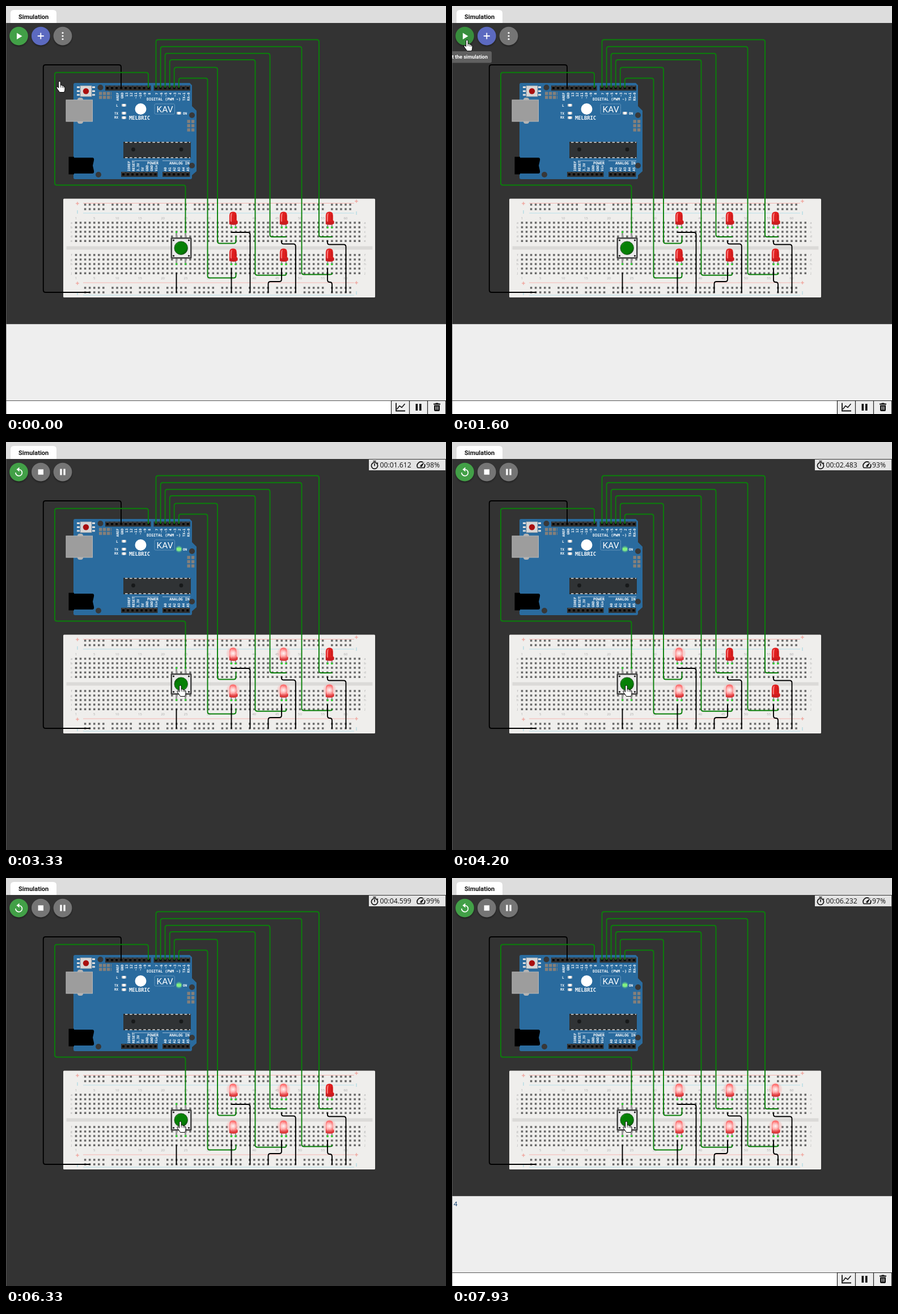
An HTML page that plays this animation: 776 px wide and 721 px high, repeating every 8000 ms.

```html
<!DOCTYPE html>
<html lang="en">
<head>
<meta charset="utf-8">
<title>Dice circuit simulation</title>
<style>
html, body { margin: 0; width: 100%; height: 100%; overflow: hidden; background: #333; }
svg { display: block; width: 776px; height: 721px; }
text { white-space: pre; }
.ui { font-family: Roboto, Arial, sans-serif; font-weight: 700; }
.read { font-family: "Open Sans", "Noto Sans", sans-serif; font-size: 12.2px; }
.silk { font-family: "DejaVu Sans Mono", monospace; font-weight: 700; fill: #fff; }
.bb { font-family: "Open Sans", sans-serif; font-size: 6px; fill: #aaa; text-anchor: middle; }
</style>
</head>
<body>
<svg id="stage" viewBox="0 0 776 721">
  <defs>
    <radialGradient id="glow">
      <stop offset="0" stop-color="#fff" stop-opacity=".95"/>
      <stop offset=".35" stop-color="#ffd0d0" stop-opacity=".85"/>
      <stop offset="1" stop-color="#ff8080" stop-opacity="0"/>
    </radialGradient>
    <radialGradient id="greenGlow">
      <stop offset="0" stop-color="#b0ffb0"/>
      <stop offset=".5" stop-color="#80ff80" stop-opacity=".6"/>
      <stop offset="1" stop-color="#80ff80" stop-opacity="0"/>
    </radialGradient>
    <linearGradient id="capUp" x1="0" y1="0" x2="1" y2="1">
      <stop offset="0" stop-color="#4fae4f"/><stop offset=".25" stop-color="#068006"/>
      <stop offset=".7" stop-color="#068006"/><stop offset="1" stop-color="#003c00"/>
    </linearGradient>
    <linearGradient id="capDown" x1="1" y1="1" x2="0" y2="0">
      <stop offset="0" stop-color="#4fae4f"/><stop offset=".25" stop-color="#068006"/>
      <stop offset=".7" stop-color="#068006"/><stop offset="1" stop-color="#003c00"/>
    </linearGradient>
    <filter id="shadow" x="-30%" y="-30%" width="160%" height="170%">
      <feDropShadow dx="0" dy="2" stdDeviation="1.8" flood-opacity=".4"/>
    </filter>
  </defs>
</svg>
<script>
const NS = 'http://www.w3.org/2000/svg';
const stage = document.getElementById('stage');
let layer = stage;

function add(tag, attrs, content) {
  const el = document.createElementNS(NS, tag);
  for (const key in attrs) el.setAttribute(key, attrs[key]);
  if (content !== undefined) el.textContent = content;
  layer.appendChild(el);
  return el;
}
const rect = (x, y, width, height, fill, more) => add('rect', { x, y, width, height, fill, ...more });
const circle = (cx, cy, r, fill, more) => add('circle', { cx, cy, r, fill, ...more });
const path = (d, fill, more) => add('path', { d, fill, ...more });
const line = (d, stroke, width = 1, more) => path(d, 'none', { stroke, 'stroke-width': width, ...more });
const label = (x, y, text, cls, more) => add('text', { x, y, class: cls, ...more }, text);
function group(draw, attrs) {
  const parent = layer;
  const g = layer = add('g', attrs);
  draw();
  layer = parent;
  return g;
}
const show = (el, on) => el.setAttribute('visibility', on ? 'visible' : 'hidden');

const PITCH = 8.06;

function drawHeader() {
  rect(0, 0, 776, 30, '#ddd');
  path('M8 30V13Q8 7 14 7H83Q89 7 89 13V30Z', '#fff');
  label(22, 22.5, 'Simulation', 'ui', { 'font-size': 11, fill: '#111' });
  rect(0, 30, 1, 691, '#555');
}

function drawBoard() {
  path('M119 139Q119 136 122 136H324L328 140V177L336 185V292L328 299V303Q328 306 325 306H122Q119 306 119 303Z', '#2a6b9e');
  for (const [x, y] of [[166.5, 144], [328, 193], [328, 282], [163, 298]]) circle(x, y, 5, '#383838');

  rect(126, 162, 10, 46, '#b4b4b4', { rx: 4 });
  rect(106, 166, 46.5, 38, '#9d9d9d', { stroke: '#b8b8b8' });
  path('M110.500 266.500H120V268H152Q156 268 155 273L153 282L155 291Q156 296 152 296H120V297.500H110.500Z', '#000');

  line('M125 143.500H157M125 150.500H157M125 157H157', '#ddd', 3, { 'stroke-dasharray': '5 22' });
  rect(131, 141, 20, 19, '#d6d6d6', { stroke: '#999', 'stroke-width': .6 });
  circle(141, 150.500, 5.2, '#a90e0e');

  line('M164 154.500H186M164 161.500H186', '#85807a', 5.4, { 'stroke-dasharray': '5.400 1.600' });
  line('M319.500 204H333M319.500 211.500H333M319.500 219H333', '#85807a', 5.4, { 'stroke-dasharray': '5.400 2' });

  for (const [x, y, n] of [[175, 140.500, 10], [260.500, 140.500, 8], [203, 293, 8], [276, 293, 6]]) {
    rect(x, y, n * PITCH, 9, '#2f2f2f');
    line(`M${x + 2} ${y + 4.500}h${n * PITCH - 2}`, '#080808', 4, { 'stroke-dasharray': '4 4.060' });
    line(`M${x + 1.500} ${y + 1.300}h${n * PITCH - 2}`, '#565656', 1, { 'stroke-dasharray': '5 3.060' });
  }

  const upright = (x, y, text, anchor) =>
    label(0, 0, text, 'silk', { 'font-size': 6, 'text-anchor': anchor, transform: `translate(${x} ${y}) rotate(-90)` });
  const pins = (list, x, y, anchor) =>
    list.split(' ').forEach((text, i) => upright(x + i * PITCH, y, text, anchor));
  pins('AREF GND 13 12 ~11 ~10 ~9 8', 198.500, 153, 'end');
  pins('7 ~6 ~5 4 ~3 2 TX→1 RX←0', 267.500, 153, 'end');
  pins('IOREF RESET 3.3V 5V GND GND Vin', 218.500, 292, 'start');
  pins('A0 A1 A2 A3 A4 A5', 282.500, 292, 'start');

  label(248, 167, 'DIGITAL (PWM ~)', 'silk', { 'font-size': 6.7 });
  label(249, 280, 'POWER', 'silk', { 'font-size': 6.6 });
  label(288, 280, 'ANALOG IN', 'silk', { 'font-size': 6.6 });
  line('M222 273.500H269M276 273.500H325', '#c8dcec', .7);

  label(194, 178, 'L', 'silk', { 'font-size': 6 });
  label(191, 192, 'TX', 'silk', { 'font-size': 6 });
  label(191, 199, 'RX', 'silk', { 'font-size': 6 });
  label(312, 192, 'ON', 'silk', { 'font-size': 6 });
  for (const [x, y] of [[204, 173], [204, 187], [204, 195], [301, 187]]) {
    rect(x, y, 8, 4.600, '#c8c8c8', { rx: .5 });
    rect(x + 2, y, 4, 4.600, '#fff');
  }

  circle(237.500, 182, 10, '#fff');
  rect(262, 173, 35.500, 18, 'none', { rx: 2, stroke: '#9fc0da', 'stroke-width': .8, 'stroke-dasharray': '1.500 1' });
  label(280, 187.500, 'KAV', 'ui', { 'font-size': 15.5, 'font-weight': 400, style: 'font-weight:400', fill: '#fff', 'text-anchor': 'middle' });
  label(217, 201, 'MELBRIC', 'silk', { 'font-size': 8.8 });

  rect(207, 240, 119, 29, '#292c2d');
  line('M210 241H325M210 268H325', '#b0b0b0', 2, { 'stroke-dasharray': '4.500 3.560' });
  rect(207, 243, 119, 23, '#303335');
  circle(224.500, 253.500, 3.4, '#17191a');
  circle(309, 253.500, 3.4, '#17191a');
}

function drawBreadboard() {
  rect(101, 340.500, 550, 174.500, '#efeeec', { rx: 1.5 });
  rect(106.500, 424.500, 540, 6, '#dbdad8');
  line('M136 348.500H614M136 489H614', '#f5b5b0', 1);
  line('M136 366H614M136 511H614', '#b5e0ea', 1);
  for (const [x, y] of [[126, 349], [618, 345], [126, 490], [618, 489]]) line(`M${x - 3} ${y}h6M${x} ${y - 3}v6`, '#f08880', .9);
  for (const [x, y] of [[126, 364], [618, 366], [126, 508], [618, 507]]) line(`M${x} ${y - 3}v6`, '#8fd0e0', .9);

  const hole = 3.5, gap = PITCH - hole;
  const rail = `${`${hole} ${gap} `.repeat(4)}${hole} ${gap + PITCH}`;
  for (const y of [351, 359, 498, 506])
    line(`M${139.600 - hole / 2} ${y}H609`, '#686868', hole, { 'stroke-dasharray': rail });
  [...'abcdefghij'].forEach((letter, i) => {
    const y = 383 + i * PITCH + (i > 4 ? 16.600 : 0);
    line(`M${123.500 - hole / 2} ${y}H625.500`, '#686868', hole, { 'stroke-dasharray': `${hole} ${gap}` });
    for (const x of [115.500, 633]) label(x, y + 2, letter, 'bb');
  });
  for (let n = 0; n <= 60; n += 5) {
    const column = n || 1;
    for (const y of [377, 483]) label(123.500 + (column - 1) * PITCH, y, column, 'bb');
  }
}

function drawButton() {
  line('M300.500 399V410M316.500 399V410M300.500 445V456M316.500 445V456', '#9a9a9a', 3);
  for (const x of [300.500, 316.500]) for (const y of [399.500, 456]) circle(x, y, 1.8, '#2bd42b');
  rect(290.500, 409, 37, 37.500, '#424242', { rx: 1.5 });
  rect(293, 411.500, 32, 32.500, '#eaeaea');
  for (const x of [295.500, 322.500]) for (const y of [414, 441.500]) circle(x, y, 1.6, '#1c1c1c');
  return circle(308.700, 427.700, 11.8, 'url(#capUp)', { stroke: '#2c4a2c', 'stroke-width': .8 });
}

function drawLed(x, y) {
  line(`M${x - 3.300} ${y + 20}V${y + 27}M${x + 4.300} ${y + 20}V${y + 27}`, '#8c8c8c', 1.8);
  circle(x - 3.300, y + 27, 1.7, '#2bd42b');
  circle(x + 4.300, y + 27, 1.7, '#2bd42b');
  const shape = `M${x - 6.600} ${y + 21}V${y + 6}Q${x - 6.600} ${y - 1} ${x} ${y - 1}T${x + 6.300} ${y + 6}V${y + 14}L${x + 8} ${y + 16}V${y + 20}Q${x + 4} ${y + 23} ${x} ${y + 22}Z`;
  const body = path(shape, '#e01e1e');
  path(`M${x - 6.600} ${y + 14}Q${x} ${y + 18} ${x + 8} ${y + 15.500}V${y + 20}Q${x} ${y + 24} ${x - 6.600} ${y + 21}Z`, '#b81c20', { opacity: .55 });
  path(`M${x - 4.800} ${y + 16}V${y + 6}Q${x - 4.500} ${y + 2} ${x - 1.500} ${y + 1}Q${x - 2.800} ${y + 7} ${x - 2.500} ${y + 17}Z`, '#ff9a9a', { opacity: .7 });
  line(`M${x + 4} ${y + 4}V${y + 14}`, '#a81818', 1.4, { opacity: .6 });
  const halo = circle(x, y + 9, 12.5, 'url(#glow)');
  return on => {
    body.setAttribute('fill', on ? '#ff4848' : '#e01e1e');
    show(halo, on);
  };
}

// Corner points alternate: x0, y0, y1, x1, y2, x2 ... with rounded bends.
function wire(color, x, y, ...turns) {
  const points = [[x, y]];
  let vertical = true;
  for (const v of turns) {
    if (vertical) y = v; else x = v;
    points.push([x, y]);
    vertical = !vertical;
  }
  let d = `M${points[0]}`;
  for (let i = 1; i < points.length - 1; i++) {
    const [cx, cy] = points[i];
    const toward = ([px, py]) => {
      const length = Math.hypot(px - cx, py - cy) || 1, r = Math.min(4, length / 2);
      return [cx + (px - cx) / length * r, cy + (py - cy) / length * r];
    };
    d += `L${toward(points[i - 1])}Q${points[i]} ${toward(points[i + 1])}`;
  }
  line(d + `L${points.at(-1)}`, color, 1.9, { 'stroke-linecap': 'round' });
}

function drawWires() {
  const green = '#0a800a', black = '#000';
  wire(black, 203, 144, 104, 65.800, 506, 148);
  wire(green, 251, 144, 117.500, 86, 316.500, 316.500, 399);
  wire(green, 264.500, 144, 59.500, 552, 408, 575);
  wire(green, 272.600, 144, 71.800, 521.500, 474.500, 575, 472);
  wire(green, 280.600, 144, 83.800, 465.500, 408, 494);
  wire(green, 288.700, 144, 95, 439.500, 475.800, 494, 472);
  wire(green, 296.700, 144, 108.500, 373, 419.500, 405.500, 407);
  wire(green, 304.800, 144, 127.500, 355.500, 480.500, 405.500, 472);
  wire(black, 397.500, 400, 400, 430.500, 506);
  wire(black, 397.500, 464, 506);
  wire(black, 486, 415, 420.500, 510.800, 506);
  wire(black, 486, 464, 487, 462.500, 506);
  wire(black, 567, 415, 421.500, 599.500, 506);
  wire(black, 567, 464, 488, 575, 506);
  wire(black, 300.500, 472, 506);
}

const roundButton = (x, fill) => circle(x, 53, 16.3, fill, { filter: 'url(#shadow)' });

function drawIdleTools() {
  roundButton(61.300, '#5c6bc0');
  roundButton(100, '#757575');
  path('M19 47.500V59L28.500 53.250Z', '#fff');
  line('M55.800 53H66.800M61.300 47.500V58.500', '#fff', 1.8);
  for (const y of [47.500, 53, 58.500]) circle(100, y, 1.6, '#fff');
}

function drawRunTools() {
  roundButton(61.300, '#757575');
  roundButton(100, '#757575');
  line('M17 54A5.700 5.700 0 1 0 22.500 48.500', '#fff', 1.7);
  path('M23.500 44.500V52.500L18.500 48.500Z', '#fff');
  rect(56.600, 48.300, 9.4, 9.4, '#fff');
  rect(95.300, 47.500, 3.3, 11, '#fff');
  rect(101.400, 47.500, 3.3, 11, '#fff');
}

function drawReadout() {
  rect(640, 31, 135, 19, '#e4e4e4');
  circle(650, 41.800, 5.6, 'none', { stroke: '#111', 'stroke-width': 1.7 });
  line('M647.500 33.700H652.500M650 38V42.500M654.500 36.500L656 38', '#111', 1.6);
  line('M726 45.500A7 7 0 0 1 735.500 36M738.300 39A7 7 0 0 1 737.500 45.500H726', '#111', 1.7);
  path('M738 35.500L733.500 43.500Q731.500 45 730.500 43Q730 41.500 731.500 40.500Z', '#111');
  return [label(659.500, 45.300, '', 'read', { fill: '#111' }), label(741, 45.300, '', 'read', { fill: '#111' })];
}

function drawMonitor() {
  rect(0, 562, 776, 135, '#eee');
  rect(0, 697, 776, 24, '#fff');
  line('M0 562.500H776', '#ccc');
  line('M0.500 562V721', '#999');
  line('M0 697.500H776', '#555');
  rect(679, 697, 97, 24, '#eee');
  line('M679 697.500H776M679.500 697V721M711.500 697V721M743.500 697V721M775.500 697V721', '#222', 1.2);
  line('M688 701.500V715.500H704', '#111', 1.8);
  line('M689.500 712.500L694 706.500L698 709.500L703.500 703', '#111', 1.6);
  rect(722.500, 703, 3.6, 12, '#111');
  rect(729, 703, 3.6, 12, '#111');
  path('M754 704.500H766V702.500H763L762 701.500H758L757 702.500H754ZM755 705.500H765V714Q765 716 763 716H757Q755 716 755 714Z', '#111');
  line('M758.400 707.500V713.500M761.600 707.500V713.500', '#eee', 1.3);
}

function drawCursor() {
  path('M-2.300 10V.800Q-2.300-1-.600-1T1.200.800V6Q3.800 4.700 4.300 7Q6.300 6 6.900 8.300Q9 7.800 9 10V13Q9 15.500 7.500 18.500H-.500Q-2 16-4 13.500Q-6.500 10.500-6 9Q-4.800 7.800-2.300 10.500Z',
    '#fff', { stroke: '#000', 'stroke-width': 1, 'stroke-linejoin': 'round' });
  line('M1.200 6V10M4.300 7.500V10.500M6.900 8.500V11', '#000', .8);
}

rect(0, 30, 776, 691, '#333');
drawHeader();
drawBoard();
const powerGlow = circle(305, 189.300, 6.5, 'url(#greenGlow)');
const powerLed = rect(301, 187, 8, 4.6, '#80f080', { rx: 1 });
drawBreadboard();
const cap = drawButton();
// Bottom and top of each column, in pin order.
const leds = [400.500, 489.500, 570.500].flatMap(x => [429.500, 364.500].map(y => drawLed(x, y)));
drawWires();
const mainButton = roundButton(22.500, '#43a047');
const idleTools = group(drawIdleTools);
const runTools = group(drawRunTools);
let clock, speed;
const readout = group(() => [clock, speed] = drawReadout());
const monitor = group(drawMonitor);
const result = label(3, 579.500, '4', 'read', { fill: '#036', style: 'font-size:11.5px' });
const tooltip = group(() => {
  rect(-26, 80, 96, 20.500, '#606060', { rx: 3 });
  label(63, 93.200, 'Start the simulation', 'ui', { 'font-size': 9, fill: '#fff', 'text-anchor': 'end' });
});
const cursor = group(drawCursor);

const LOOP = 8000, STEP = 200 / 3;
const RUN = 1730, RESULT = 6600;
const cursorKeys = [[0, 95, 134], [200, 94, 132], [870, 68, 110], [1200, 40, 76], [1470, 27, 61], [1800, 27, 61],
  [2000, 120, 205], [2270, 289, 436], [2400, 300, 434], [2670, 308, 431], [8000, 308, 431]];
const clockKeys = [[1800, 83], [2270, 550], [4200, 2483], [5270, 3549], [6330, 4599], [7930, 6232]];
const speedSteps = [[1800, 95], [2000, 97], [2670, 99], [2930, 100], [3330, 98], [3530, 100], [3800, 96], [4130, 93],
  [4470, 97], [4800, 98], [5270, 100], [5470, 99], [6730, 98], [7070, 100], [7400, 99], [7870, 97]];
const rolls = [{ start: 3000, faces: '251462362541362452' }, { start: 7530, faces: '316' }];
const presses = [[2870, 3600], [7270, 7670]];

function tween(keys, t) {
  let i = 1;
  while (i < keys.length - 1 && keys[i][0] < t) i++;
  const [a, b] = [keys[i - 1], keys[i]];
  const f = Math.max(0, Math.min(1, (t - a[0]) / (b[0] - a[0])));
  return a.slice(1).map((v, n) => v + (b[n + 1] - v) * f);
}
const latest = (steps, t) => steps.reduce((value, [at, v]) => t >= at ? v : value, 0);

function litCount(t) {
  for (const { start, faces } of rolls) {
    const i = Math.floor((t - start) / 200);
    if (i >= 0 && i < faces.length) return +faces[i];
  }
  return t >= RESULT ? 4 : 0;
}

function render(time) {
  const t = Math.round(Math.floor((time + 3.4) / STEP) * STEP / 10) * 10 % LOOP;
  const running = t >= RUN, counting = t >= 1800;
  const [x, y] = tween(cursorKeys, t);
  cursor.setAttribute('transform', `translate(${x} ${y})`);
  mainButton.setAttribute('fill', Math.hypot(x - 22.500, y - 53) < 16.300 ? '#388e3c' : '#43a047');
  show(idleTools, !running);
  show(runTools, running);
  show(tooltip, t >= 1530 && !running);
  show(monitor, !running || t >= RESULT);
  show(result, t >= RESULT);
  show(powerGlow, running);
  show(powerLed, running);
  show(readout, counting);
  if (counting) {
    const ms = Math.round(tween(clockKeys, t)[0]);
    clock.textContent = `00:${(ms / 1000).toFixed(3).padStart(6, '0')}`;
    speed.textContent = `${latest(speedSteps, t)}%`;
  }
  const pressed = presses.some(([from, to]) => t >= from && t < to);
  cap.setAttribute('fill', pressed ? 'url(#capDown)' : 'url(#capUp)');
  const lit = litCount(t);
  leds.forEach((light, i) => light(i < lit));
}

const began = performance.now();
(function tick() {
  render((performance.now() - began) % LOOP);
  requestAnimationFrame(tick);
})();
</script>
</body>
</html>
```
